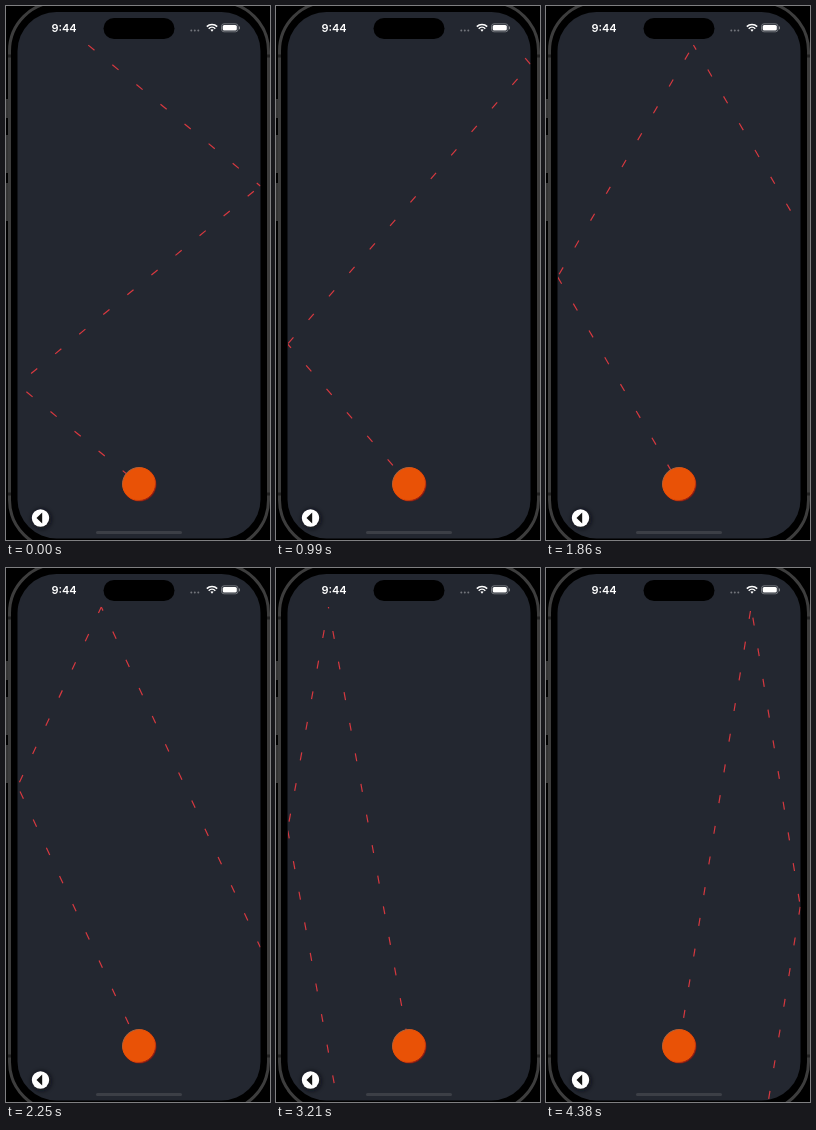
Animation, 264 px wide and 534 px high, one loop 4410 ms. Source, as an HTML page:

```html
<!DOCTYPE html>
<html lang="en">
<head>
<meta charset="utf-8">
<style>
  html, body { margin: 0; width: 100%; height: 100%; overflow: hidden; background: #000; }
  svg { display: block; width: 264px; height: 534px; }
  text { font: 600 11px Inter, sans-serif; fill: #fff; }
</style>
</head>
<body>
<svg viewBox="0 0 264 534">
  <defs>
    <clipPath id="screen"><rect x="12" y="38.5" width="242.5" height="494" /></clipPath>
    <linearGradient id="rim" x1="0" y1="0" x2="1" y2="1">
      <stop offset=".12" stop-color="#8d6a58" />
      <stop offset=".35" stop-color="#e95206" />
      <stop offset=".65" stop-color="#e04a06" />
      <stop offset=".88" stop-color="#8e1c14" />
    </linearGradient>
    <filter id="soft" x="-50%" y="-50%" width="200%" height="200%"><feGaussianBlur stdDeviation="2" /></filter>
  </defs>

  <!-- phone body -->
  <path d="M1 93v19M1 129v38M1 177v38" stroke="#353535" stroke-width="2" />
  <rect x="3.5" y="-4" width="259" height="547" rx="49" fill="#000" stroke="#3d3d3d" stroke-width="3" />
  <path d="M2 50h3M261 50h3M2 488h3M261 488h3" stroke="#222" stroke-width="3" />
  <rect x="11.5" y="6" width="243" height="526.5" rx="39" fill="#232730" />
  <rect x="97.500" y="12" width="71" height="21" rx="10.500" fill="#000" />

  <!-- status bar -->
  <text x="45.500" y="25.800">9:44</text>
  <path d="M185.300 24.500h10.500" stroke="#73767c" stroke-width="2" stroke-linecap="round" stroke-dasharray="0 3.500" />
  <g fill="none" stroke="#fff" stroke-width="1.500">
    <path d="M200.800 20.600a7.300 7.300 0 0 1 10.400 0M202.700 22.700a4.700 4.700 0 0 1 6.600 0" />
    <path d="M204.400 23.800L206 25.700l1.600-1.900q-1.600-1.300-3.200 0z" fill="#fff" stroke="none" />
  </g>
  <rect x="215.500" y="17.800" width="16.500" height="8" rx="2.500" fill="none" stroke="#85888d" stroke-width=".8" />
  <rect x="216.700" y="19" width="14.100" height="5.600" rx="1.500" fill="#fff" />
  <path d="M233.500 20.500v2.800" stroke="#85888d" />

  <g id="legs" clip-path="url(#screen)" stroke="#d6383f" stroke-width="1.200"></g>

  <!-- ball, back button, home bar -->
  <circle cx="133.500" cy="478.500" r="17" fill="#7a1714" />
  <circle cx="133" cy="478" r="16.500" fill="#e95206" stroke="url(#rim)" />
  <circle cx="35.500" cy="513" r="10" fill="#0c0e12" opacity=".75" filter="url(#soft)" />
  <circle cx="34.500" cy="512" r="8.700" fill="#fff" />
  <path d="M30.500 512l5.700-5.500v11z" fill="#111" />
  <rect x="90" y="525" width="86" height="3" rx="1.500" fill="#3c3f46" />
</svg>
<script>
const LOOP = 4410, PERIOD = 31.1, DASH = 8;
const LEFT = 11.6, RIGHT = 254.3, TOP = 39, BOTTOM = 560;

// time, sideways run per unit of rise (left positive), dash centre on each leg
const keys = [
  [0, 1.222, 17.1, 21.4, 0.6],
  [510, 1.03, 17.4, 35.4, 5],
  [1470, 0.705, 39.8, 36.6, 2.7],
  [2250, 0.4675, 59.3, 39.5, 0],
  [3210, 0.1838, 75.8, 58.6, 5],
  [3960, -0.041, 89.2, 62.6, 5],
  [4380, -0.164, 94.7, 76.9, 4.5],
];

const group = document.getElementById("legs");
const legs = [0, 1, 2].map(() =>
  group.appendChild(document.createElementNS("http://www.w3.org/2000/svg", "line")));

function sample(t) {
  let i = 0;
  while (i < keys.length - 2 && t > keys[i + 1][0]) i++;
  const a = keys[i], b = keys[i + 1];
  const u = (t - a[0]) / (b[0] - a[0]);
  return a.map((v, k) => v + (b[k] - v) * u);
}

function draw(now) {
  const [, slope, ...phases] = sample(now % LOOP);
  let x = 133, y = 478, dx = -slope, dy = -1;
  legs.forEach((leg, i) => {
    const toSide = dx ? ((dx < 0 ? LEFT : RIGHT) - x) / dx : Infinity;
    const toEnd = ((dy < 0 ? TOP : BOTTOM) - y) / dy;
    const run = Math.max(0, Math.min(toSide, toEnd));
    const x2 = x + dx * run, y2 = y + dy * run;
    // the returning leg thins out when the aim is almost upright
    const dash = i === 1 && Math.abs(slope) < 0.08 ? 3.5 : DASH;
    const attrs = {
      x1: x, y1: y, x2, y2,
      "stroke-dasharray": `${dash} ${PERIOD - dash}`,
      "stroke-dashoffset": dash / 2 - phases[i],
    };
    for (const name in attrs) leg.setAttribute(name, attrs[name]);
    if (toSide < toEnd) dx = -dx;
    else if (dy < 0) dy = 1;
    x = x2;
    y = y2;
  });
  requestAnimationFrame(draw);
}
requestAnimationFrame(draw);
</script>
</body>
</html>
```
